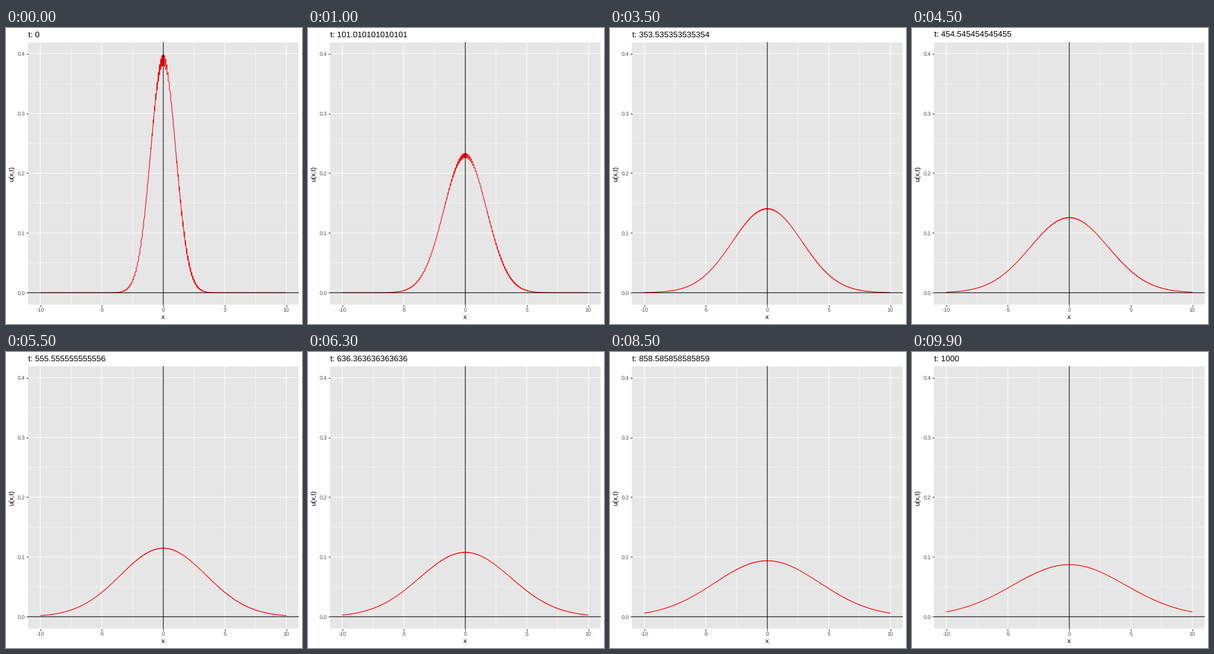
A matplotlib script that plays this animation: 480 by 480 pixels, repeating every 10000 ms.

```python
import numpy as np
import matplotlib.pyplot as plt
from matplotlib.animation import FuncAnimation

SIZE, DPI, FRAMES = 480, 72, 100
LEFT, RIGHT, TOP, BOTTOM = 35.6, 474.5, 23.3, 448.6
THIN, THICK = 0.53, 1.07

plt.rcParams.update({
    "font.family": "Liberation Sans",
    "text.hinting": "none",
    "path.simplify": False,
    "path.snap": False,
})

x = np.linspace(-10, 10, 201)
steps = np.arange(1001)
frame_of_step = np.round(steps * (FRAMES - 1) / 1000).astype(int)


def heat(x, t):
    """Gaussian spreading with diffusion coefficient 0.01."""
    var = 1 + 0.02 * t
    return np.exp(-x**2 / (2 * var)) / np.sqrt(2 * np.pi * var)


def grid(xs, ys, width):
    for v in xs:
        ax.axvline(v, color="white", lw=width, zorder=1)
    for v in ys:
        ax.axhline(v, color="white", lw=width, zorder=1)


fig = plt.figure(figsize=(SIZE / DPI, SIZE / DPI), dpi=DPI, facecolor="white")
ax = fig.add_axes([LEFT / SIZE, 1 - BOTTOM / SIZE,
                   (RIGHT - LEFT) / SIZE, (BOTTOM - TOP) / SIZE])
ax.set_facecolor("#e6e6e6")
ax.spines[:].set_visible(False)

peak = heat(0, 0)
ax.set_xlim(-11, 11)
ax.set_ylim(-0.05 * peak, 1.05 * peak)

x_major = np.arange(-10, 11, 5)
y_major = np.arange(5) / 10
grid(x_major[:-1] + 2.5, y_major[:-1] + 0.05, THIN)
grid(x_major, y_major, THICK)

ax.set_xticks(x_major, [f"{v}" for v in x_major])
ax.set_yticks(y_major, [f"{v:.1f}" for v in y_major])
ax.tick_params(length=2.75, width=THICK, pad=2.2, color="#333333",
               labelcolor="#4d4d4d", labelsize=8.8)


def label(px, py, text, size, **kw):
    return fig.text(px / SIZE, 1 - py / SIZE, text, fontsize=size,
                    color="black", **kw)


label(255, 472.5, "x", 11, ha="center", va="baseline")
label(10.5, 236, "u(x,t)", 11, ha="center", va="center", rotation=90)
title = label(LEFT, 15, "", 13.2, ha="left", va="baseline")

curve, = ax.plot([], [], color="red", lw=THICK, zorder=3,
                 solid_joinstyle="round", solid_capstyle="butt")
ax.axhline(0, color="black", lw=THICK, zorder=4)
ax.axvline(0, color="black", lw=THICK, zorder=4)


def update(i):
    # All time steps nearest this frame share one line, ordered by x then t.
    t = steps[frame_of_step == i]
    xx, tt = np.meshgrid(x, t, indexing="ij")
    curve.set_data(xx.ravel(), heat(xx, tt).ravel())
    title.set_text(f"t: {1000 * i / (FRAMES - 1):.15g}")
    return curve, title


anim = FuncAnimation(fig, update, frames=FRAMES, interval=100,
                     repeat=True, repeat_delay=0)
plt.show()
```
